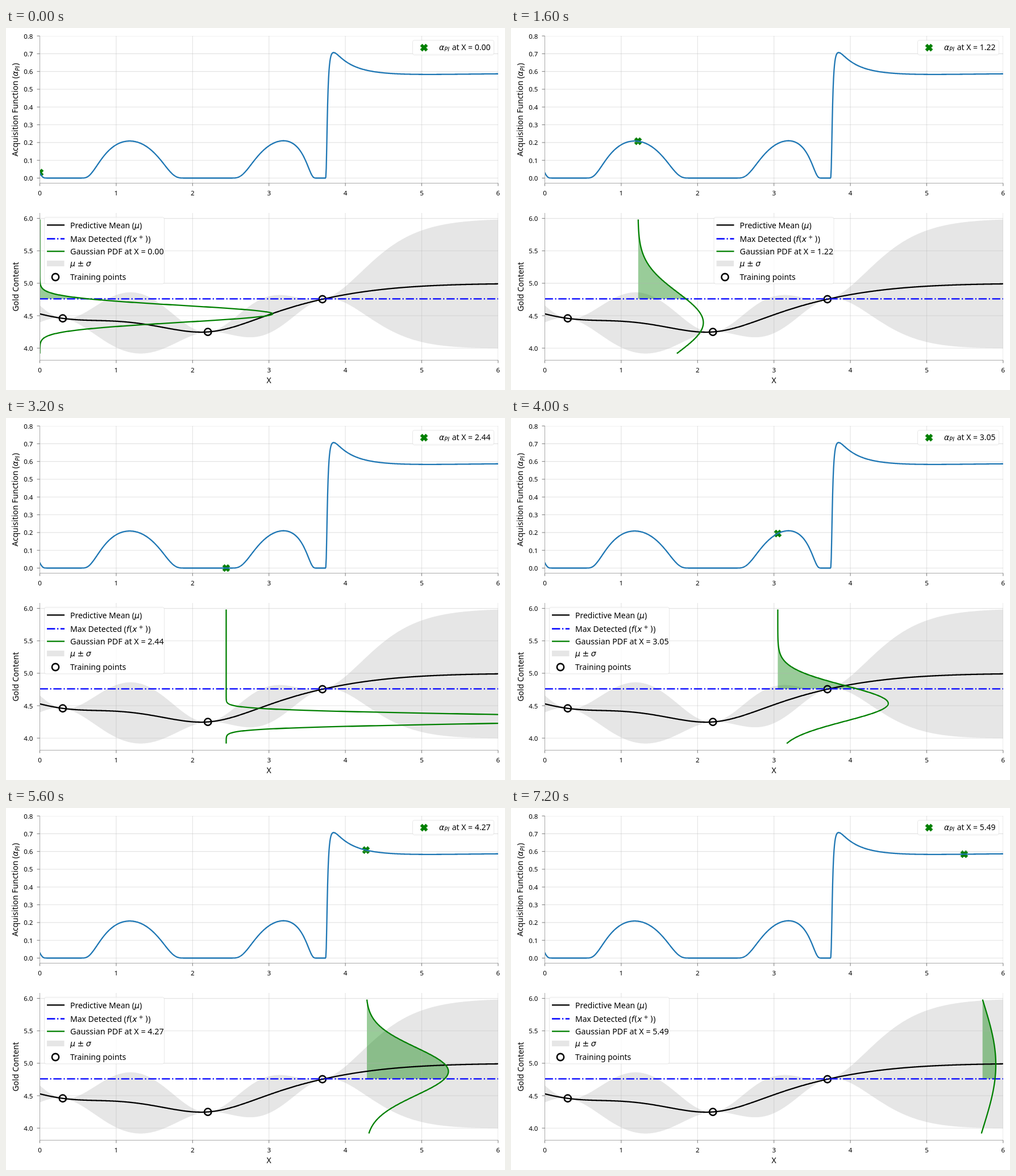
An HTML page with a canvas for the animation above (8 s loop, 878 by 638 pixels).

```html
<!DOCTYPE html>
<html lang="en">
<head>
<meta charset="utf-8">
<title>Probability of improvement</title>
<style>
html, body { margin: 0; width: 100%; height: 100%; overflow: hidden; background: #fff; }
canvas { display: block; }
</style>
</head>
<body>
<canvas id="stage" width="878" height="638"></canvas>
<script>
const ctx = document.getElementById('stage').getContext('2d');

const STEP_MS = 800, STEPS = 10, STEP_X = 0.61;
const BEST = 4.76, THRESHOLD = 4.773;
const TRAINING = [[0.3, 4.459], [2.2, 4.25], [3.7, 4.754]];
const LEFT = 59.5, RIGHT = 866, LINE = 2.3;
const TOP = { y0: 14, y1: 273.5, ticks: [0, .1, .2, .3, .4, .5, .6, .7, .8], py: v => 264.5 - 313.1 * v };
const LOW = { y0: 326, y1: 585.5, ticks: [4, 4.5, 5, 5.5, 6], py: v => 564.2 - 114.3 * (v - 4) };
const px = x => LEFT + 134.4 * x;

const FONT = {
  plain: '14px "Noto Sans", sans-serif',
  wide: '14.3px "Noto Sans", sans-serif',
  tick: '11.6px "Noto Sans", sans-serif',
  math: 'italic 14px "DejaVu Sans", sans-serif',
  sign: '14px "DejaVu Sans", sans-serif',
  sub: 'italic 9.8px "DejaVu Sans", sans-serif',
  sup: '9.8px "DejaVu Sans", sans-serif'
};

// Gaussian process: Matern 5/2 prior around 5, conditioned on one point at a time.
const matern = (a, b) => {
  const s = Math.sqrt(5) * Math.abs(a - b);
  return (1 + s + s * s / 3) * Math.exp(-s);
};
const model = TRAINING.reduce(({ mean, cov }, [p, y]) => {
  const spread = cov(p, p), error = y - mean(p);
  return {
    mean: x => mean(x) + cov(x, p) / spread * error,
    cov: (a, b) => cov(a, b) - cov(a, p) * cov(p, b) / spread
  };
}, { mean: () => 5, cov: matern });
const sigma = x => Math.max(model.cov(x, x), 1e-9);
const density = z => Math.exp(-z * z / 2) / Math.sqrt(2 * Math.PI);

function normalCdf(z) {
  const t = 1 / (1 + 0.2316419 * Math.abs(z));
  const tail = density(z) * t * (0.31938153 + t * (-0.356563782
    + t * (1.781477937 + t * (-1.821255978 + t * 1.330274429))));
  return z > 0 ? 1 - tail : tail;
}
const improvement = x => normalCdf((model.mean(x) - THRESHOLD) / sigma(x));

const range = (from, to, n) => Array.from({ length: n + 1 }, (_, i) => from + (to - from) * i / n);
const xs = range(0, 6, 1000);
const upper = xs.map(x => [px(x), LOW.py(model.mean(x) + sigma(x))]);
const lower = xs.map(x => [px(x), LOW.py(model.mean(x) - sigma(x))]);
const meanCurve = xs.map(x => [px(x), LOW.py(model.mean(x))]);
const alphaCurve = xs.map(x => [px(x), TOP.py(improvement(x))]);
const band = upper.concat([...lower].reverse());
const yMin = Math.min(...xs.map(x => model.mean(x) - sigma(x)));
const yMax = Math.max(...xs.map(x => model.mean(x) + sigma(x)));

function trace(points) {
  ctx.beginPath();
  points.forEach(([x, y]) => ctx.lineTo(x, y));
}
function stroke(points, color, width = LINE, dash = []) {
  trace(points);
  ctx.strokeStyle = color;
  ctx.lineWidth = width;
  ctx.setLineDash(dash);
  ctx.stroke();
  ctx.setLineDash([]);
}
function fill(points, color) {
  trace(points);
  ctx.fillStyle = color;
  ctx.fill();
}
const dashDot = points => stroke(points, '#00f', LINE, [14.4, 3.6, 2.25, 3.6]);

// Each part is [text, font, rise, gap before].
function write(x, y, parts, align = 0) {
  const widths = parts.map(([text, font, , gap = 0]) => {
    ctx.font = FONT[font];
    return gap + ctx.measureText(text).width;
  });
  x -= align * widths.reduce((a, b) => a + b, 0);
  ctx.fillStyle = '#000';
  parts.forEach(([text, font, rise = 0, gap = 0], i) => {
    ctx.font = FONT[font];
    ctx.fillText(text, x + gap, y - rise);
    x += widths[i];
  });
}
function writeUp(x, y, parts) {
  ctx.save();
  ctx.translate(x, y);
  ctx.rotate(-Math.PI / 2);
  write(0, 0, parts, 0.5);
  ctx.restore();
}

function cross(x, y) {
  const corners = [[-1, -2], [0, -1], [1, -2], [2, -1], [1, 0], [2, 1],
    [1, 2], [0, 1], [-1, 2], [-2, 1], [-1, 0], [-2, -1]];
  fill(corners.map(([a, b]) => [x + a * 3, y + b * 3]), '#008000');
  ctx.closePath();
  ctx.strokeStyle = '#008000';
  ctx.lineWidth = 1.2;
  ctx.stroke();
}
function ring(x, y) {
  ctx.beginPath();
  ctx.arc(x, y, 6.1, 0, 2 * Math.PI);
  ctx.strokeStyle = '#000';
  ctx.lineWidth = 2.6;
  ctx.stroke();
}
function legendBox(x, y, w, h) {
  ctx.beginPath();
  ctx.roundRect(x, y, w, h, 3);
  ctx.fillStyle = 'rgba(255,255,255,.8)';
  ctx.fill();
  ctx.strokeStyle = 'rgba(204,204,204,.45)';
  ctx.lineWidth = 1;
  ctx.stroke();
}

function clipped(axes, draw) {
  ctx.save();
  ctx.beginPath();
  ctx.rect(LEFT, axes.y0, RIGHT - LEFT, axes.y1 - axes.y0);
  ctx.clip();
  draw();
  ctx.restore();
}
function grid({ y0, y1, ticks, py }) {
  const color = 'rgba(176,176,176,.35)';
  for (let x = 0; x <= 6; x++) stroke([[px(x), y0], [px(x), y1]], color, 1.1);
  ticks.forEach(v => stroke([[LEFT, py(v)], [RIGHT, py(v)]], color, 1.1));
}
function frame({ y0, y1, ticks, py }) {
  stroke([[LEFT, y0], [LEFT, y1], [RIGHT, y1]], '#aaa', 1);
  for (let x = 0; x <= 6; x++) {
    stroke([[px(x), y1], [px(x), y1 + 5]], '#777', 1);
    write(px(x), y1 + 21.5, [[String(x), 'tick']], 0.5);
  }
  ticks.forEach(v => {
    stroke([[LEFT - 5, py(v)], [LEFT, py(v)]], '#777', 1);
    write(47.5, py(v) + 4.5, [[v.toFixed(1), 'tick']], 1);
  });
}

function drawAcquisition(x, step) {
  clipped(TOP, () => {
    cross(px(x), TOP.py(improvement(x)));
    grid(TOP);
    stroke(alphaCurve, '#1f77b4');
  });
  frame(TOP);
  writeUp(21, 144, [['Acquisition Function (', 'plain'], ['α', 'math'], ['PI', 'sub', -2.5], [')', 'plain', 0, 1]]);

  const shift = step === 1 ? 2 : 0;
  legendBox(715.5 + shift, 21.5, 143 - shift, 26);
  cross(735.5 + shift, 34.7);
  write(762 + shift, 38.5, [['α', 'math'], ['PI', 'sub', -2.5]]);
  write(852.5 + shift, 38.5, [['at X = ' + x.toFixed(2), 'plain']], 1);
}

function drawPrediction(x, step) {
  const mu = model.mean(x), s = sigma(x);
  const bell = y => [px(x + density((y - mu) / s) / s), LOW.py(y)];
  const tail = range(BEST, yMax, 600).map(bell);
  const edge = Math.min(...tail.map(p => p[0]));

  clipped(LOW, () => {
    fill(band, 'rgba(128,128,128,.2)');
    fill([[edge, LOW.py(BEST)], ...tail, [edge, LOW.py(yMax)]], 'rgba(0,128,0,.4)');
    TRAINING.forEach(([a, b]) => ring(px(a), LOW.py(b)));
    grid(LOW);
    stroke(meanCurve, '#000');
    dashDot([[LEFT, LOW.py(BEST)], [RIGHT, LOW.py(BEST)]]);
    stroke(range(yMin, yMax, 1000).map(bell), '#008000');
  });
  frame(LOW);
  writeUp(21.5, 456, [['Gold Content', 'plain']]);
  write(462.7, 626, [['X', 'plain']], 0.5);

  const left = step === 1 || step === 2 ? 357 : 67.5;
  const sample = y => [[left + 4.5, y], [left + 35.5, y]];
  const label = (y, ...parts) => write(left + 45.5, y, parts);
  legendBox(left, 333.5, 211, 117.5);
  stroke(sample(347.3), '#000');
  label(352.5, ['Predictive Mean (', 'plain'], ['μ', 'math'], [')', 'plain']);
  dashDot(sample(371.5));
  label(376.5, ['Max Detected (', 'plain'], ['f', 'math'], ['(', 'sign'], ['x', 'math'],
    ['+', 'sup', 5, 3], [')', 'sign', 0, 3], [')', 'plain']);
  stroke(sample(393.6), '#008000');
  label(398.5, ['Gaussian PDF at X = ' + x.toFixed(2), 'wide']);
  ctx.fillStyle = 'rgba(128,128,128,.2)';
  ctx.fillRect(left + 4.5, 410, 30.5, 10);
  label(420, ['μ', 'math'], ['±', 'sign', 0, 3.5], ['σ', 'math', 0, 3.5]);
  ring(left + 19.5, 439);
  label(443.5, ['Training points', 'plain']);
}

function draw(now) {
  const step = Math.floor(now / STEP_MS) % STEPS;
  ctx.fillStyle = '#fff';
  ctx.fillRect(0, 0, 878, 638);
  drawAcquisition(step * STEP_X, step);
  drawPrediction(step * STEP_X, step);
  requestAnimationFrame(draw);
}
draw(0);
</script>
</body>
</html>
```
